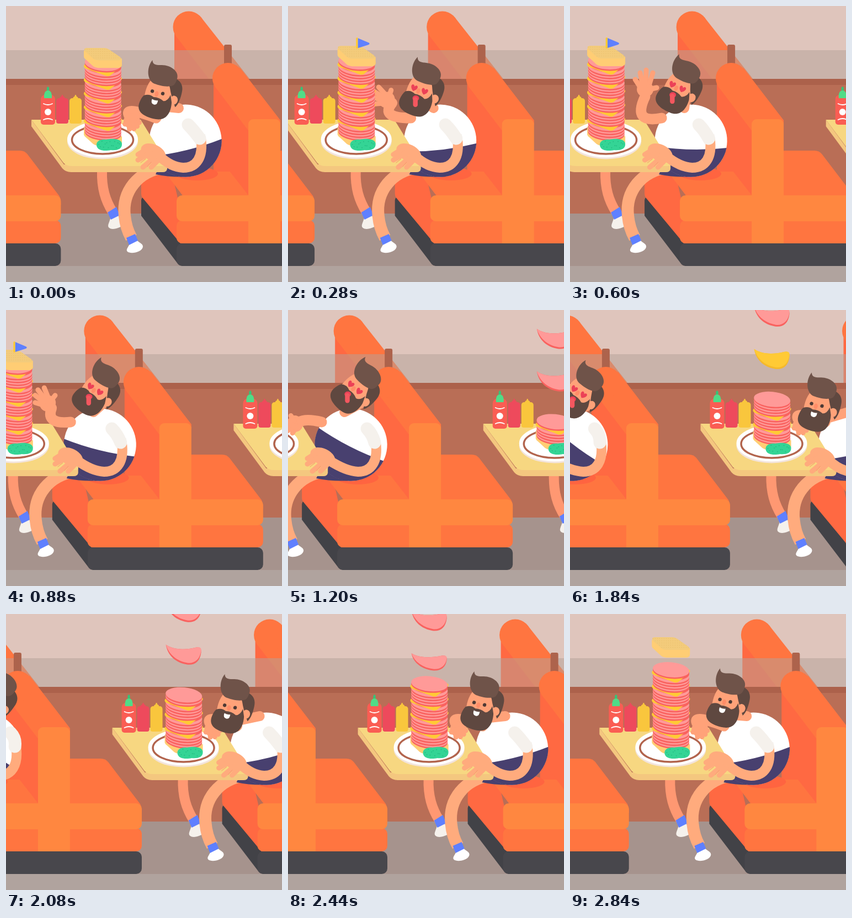
Animation, 500 px wide and 500 px high, one loop 2880 ms. Source, as an HTML page with a canvas:

```html
<!DOCTYPE html>
<html lang="en">
<head>
<meta charset="utf-8">
<title>Diner</title>
<style>
  html, body { margin: 0; height: 100%; overflow: hidden; background: #dfc5bc; }
  canvas { display: block; width: 100vw; height: 100vh; }
</style>
</head>
<body>
<canvas width="500" height="500"></canvas>
<script>
const ctx = document.querySelector('canvas').getContext('2d');
const FRAME_MS = 40, FRAMES = 72, SPACING = 527.6;
const C = {
  orange: '#ff7540', dark: '#ff6942', light: '#ff8740', base: '#48474c', baseSide: '#424247',
  skin: '#ffab7d', skinFar: '#ff9872', face: '#ffa279', hair: '#6f5349', beard: '#5f4840',
  navy: '#48406f', blue: '#5f80ff', white: '#fff', offWhite: '#f5f1ec',
  crust: '#ffcd74', crumb: '#f3cb7b', ham: '#ff9a98', hamEdge: '#f9625f', cheese: '#ffca35',
  red: '#ec4157', green: '#34d495'
};

// ---------- drawing helpers ----------
function fill(path, color) {
  ctx.fillStyle = color;
  ctx.fill(new Path2D(path));
}
function line(path, color, width, cap = 'round') {
  ctx.strokeStyle = color;
  ctx.lineWidth = width;
  ctx.lineCap = cap;
  ctx.lineJoin = 'round';
  ctx.stroke(new Path2D(path));
}
function oval(x, y, rx, ry, color, turn = 0) {
  ctx.fillStyle = color;
  ctx.beginPath();
  ctx.ellipse(x, y, rx, ry, turn, 0, 7);
  ctx.fill();
}
function box(x, y, w, h, r, color) {
  ctx.fillStyle = color;
  ctx.beginPath();
  ctx.roundRect(x, y, w, h, r);
  ctx.fill();
}
function at(x, y, degrees, draw) {
  ctx.save();
  ctx.translate(x, y);
  ctx.rotate(degrees * Math.PI / 180);
  draw();
  ctx.restore();
}
// Interpolates rows of [time, ...values] with a smooth or linear ramp.
function pose(t, keys, smooth = true) {
  if (t <= keys[0][0]) return keys[0].slice(1);
  for (let i = 1; i < keys.length; i++) {
    const a = keys[i - 1], b = keys[i];
    if (t > b[0]) continue;
    let p = (t - a[0]) / (b[0] - a[0]);
    if (smooth) p = p * p * (3 - 2 * p);
    return a.slice(1).map((v, j) => v + (b[j + 1] - v) * p);
  }
  return keys.at(-1).slice(1);
}

// ---------- room ----------
function farBench() {
  fill('M305 50V135H440L331 38Z', C.dark);
  fill('M309 56L372 138H446L353 20Z', C.orange);
  oval(331, 38, 28.5, 28.5, C.orange);
}
function wall() {
  box(0, 80, 500, 52, 0, 'rgba(179,161,154,.5)');
  box(0, 132, 500, 244, 0, '#b96e56');
  box(0, 132, 500, 11, 0, '#ac614b');
  box(0, 376, 500, 95, 0, '#a6938d');
  box(0, 471, 500, 29, 0, '#b0a39e');
}
function bench() {
  box(395, 70, 14, 45, 3, '#ad634c');
  // base and cushions seen from the left
  fill('M245 352Q246 344 252 349L330 440L322 471Q314 471 309 464L245 380Z', C.baseSide);
  fill('M245 300H300L330 430H316L247 347Q245 344 245 340Z', C.dark);
  // backrest and seat
  fill('M376 132V300L440 345V190Z', C.dark);
  fill('M287 300H376L440 300V346H322Z', C.orange);
  fill('M376 230V262L440 344V230Z', C.dark);
  fill('M380 148L440 227V215H497V207L424 112Z', C.orange);
  oval(402, 131, 28, 28, C.orange);
  fill('M490 262H553Q561 262 566 268L624 344Q627 350 627 360H490Z', C.orange);
  // front ends
  box(309, 430, 318, 41, 10, C.base);
  box(309, 388, 318, 42, 10, C.orange);
  box(309, 343, 318, 47, 10, C.light);
  box(439, 205, 58, 225, [9, 9, 0, 0], C.light);
  oval(346, 304, 38, 12, '#ff6440');
}

// ---------- table ----------
function legs() {
  line('M174 298C173 330 180 352 193 373', C.skinFar, 18, 'butt');
  fill('M190 381C188 392 182 398 187 402C193 407 208 401 212 397L202 377Z', C.offWhite);
  fill('M184 374L200 364L206 379L190 387Z', C.blue);
  line('M284 293C240 300 210 335 215 380Q217 402 227 420', C.skin, 22, 'butt');
  fill('M224 430C223 436 216 441 220 445C226 450 247 446 248 436C248 430 241 429 237 424Z', C.white);
  fill('M218 420L234 413L239 425L223 433Z', C.blue);
}
function squeezeBottle(x, color) {
  box(x - 11, 167, 22, 46, [5, 5, 4, 4], color);
  fill(`M${x - 5} 168L${x - 4} 165Q${x - 1} 164 ${x - 1} 161H${x + 1}Q${x + 1} 164 ${x + 4} 165L${x + 5} 168Z`, color);
}
function table() {
  fill('M46 206L105 287H292V295Q291 301 284 301H118Q108 301 102 294L46 218Z', '#f4c77f');
  fill('M46 206H244L292 284Q293 290 288 290H120Q109 290 104 284Z', '#f7d781');

  fill('M74 153Q73 147 76 146Q79 147 78 153Z', '#36c478');
  oval(76, 160, 6.5, 7, '#50dc87');
  box(63, 161, 26, 54, [8, 8, 5, 5], '#fa5d53');
  box(69, 158, 14, 9, [4, 4, 1, 1], '#50dc87');
  line('M68 177Q76 181 84 177M68 206Q76 202 84 206', C.white, 1.8);
  oval(76, 192, 6, 6, C.white);
  squeezeBottle(102, '#ee4a5c');
  squeezeBottle(126, '#f9c63d');

  oval(175, 245.5, 64, 32, '#f3e4dc');
  oval(175, 241.5, 64, 33, C.white);
  ctx.strokeStyle = '#b2644d';
  ctx.lineWidth = 3.5;
  ctx.beginPath();
  ctx.ellipse(175, 242.5, 55.5, 25.5, 0, 0, 7);
  ctx.stroke();
}

// ---------- sandwich ----------
function bread(y) {
  ctx.save();
  ctx.translate(0, y);
  fill('M141 5V17Q142 20 145 22L158 34Q162 37 167 37H204Q210 36 210 31V20Z', C.crust);
  const top = 'M146 0H178Q183 0 187 3L207 17Q212 23 205 23H168Q162 23 158 20L143 6Q139 1 146 0Z';
  fill(top, C.crumb);
  ctx.clip(new Path2D(top));
  ctx.setLineDash([1, 3]);
  for (let x = 143; x < 210; x += 4) line(`M${x} 2V22`, '#e6bb68', 1, 'butt');
  ctx.restore();
}
function slice(y, isCheese) {
  const cy = y + 14;
  if (isCheese) {
    // a square laid cornerwise, so only its tips show
    oval(175.7, cy, 33.2, 13.6, C.hamEdge, .1);
    fill(`M142 ${cy - 3}Q139 ${cy + 1} 144 ${cy + 4}L182 ${cy + 18}Q186 ${cy + 19} 189 ${cy + 17}L209 ${cy}Q212 ${cy - 4} 207 ${cy - 6}Z`, C.cheese);
  } else {
    oval(175.7, cy + 2.6, 33.2, 13.6, C.hamEdge, .1);
    oval(175.7, cy, 33.2, 13.6, C.ham, .1);
  }
}
function fallingSlice(y, flatness, isCheese) {
  ctx.save();
  ctx.translate(143, y);
  ctx.scale(1, flatness);
  fill('M0 0C12 8 30 11 55 5Q65 3 64 14C62 31 52 38 38 36C20 33 4 22 0 0Z', isCheese ? '#f5b92c' : C.hamEdge);
  fill('M0 0C12 8 30 11 55 5Q65 3 64 11C62 27 51 35 39 33C21 30 6 19 0 0Z', isCheese ? C.cheese : C.ham);
  ctx.restore();
}
function sandwich(t) {
  const squash = t < 0 ? 1 : 1 - .023 * Math.exp(-t / 3) * Math.cos(t * .8);
  ctx.save();
  ctx.translate(0, 245 * (1 - squash));
  ctx.scale(1, squash);
  bread(216);
  // one slice lands every second step
  for (let i = 0; i < 26; i++) {
    const landing = -52 + 2 * i, wait = landing - t, y = 213.7 - 5.07 * i;
    const isCheese = i % 5 === 4;
    if (wait <= 0) slice(y, isCheese);
    else if (wait < 7) fallingSlice(y - 36 * wait, wait < 2 ? .86 : 1, isCheese);
  }
  if (t > -5) bread(72 + Math.min(0, t) * 30);
  if (t > 1) {
    const y = Math.min(0, t - 5) * 30;
    box(174.5, 57 + y, 3.5, 20, 1.5, C.cheese);
    fill(`M178 ${58 + y}L197 ${66 + y}Q201 ${68 + y} 197 ${70 + y}L178 ${76 + y}Z`, C.blue);
  }
  ctx.restore();

  fill('M164 253C163 244 172 241 181 242C190 240 208 239 210 249C211 260 200 262 190 261C180 263 166 263 164 253Z', C.green);
  for (let i = 0; i < 14; i++)
    oval(168 + i * 2.9, 251 + 6 * Math.sin(i * 2.4), 1, 1, '#24bf84');
}

// ---------- diner guest ----------
function torso(t) {
  const [x, turn, waist] = pose(t, [[0, 325, -14, 12], [14, 329, 1, 11], [30, 334, 27, -1], [40, 338, 37, -7], [54, 343, 39, -7]]);
  fill('M278 290L271 305Q300 311 332 309V280Z', C.navy);
  at(x, 244, turn, () => {
    oval(0, 0, 65.5, 65.5, C.white);
    ctx.beginPath();
    ctx.arc(0, 0, 65.8, 0, 7);
    ctx.clip();
    fill(`M-70 ${waist}Q0 ${waist + 10} 70 ${waist}V70H-70Z`, C.navy);
  });
  return x;
}
function farArm(t, bodyX) {
  const [cx, cy, wx, wy, turn, reach] = pose(t, [
    [0, 206, 178, 226, 203, -200, .42], [11, 222, 214, 246, 164, 0, 1],
    [18, 222, 214, 246, 164, 0, 1], [28, 252, 196, 240, 203, -112, .6]]);
  line(`M${bodyX - 53} 203Q${cx} ${cy} ${wx} ${wy}`, C.face, 19);
  at(wx, wy, turn, () => {
    oval(0, -13 * reach, 15, 14, C.face);
    for (const [x, y] of [[-18, -31], [-9, -43], [2, -48], [14, -43], [21, -16]])
      line(`M${x * .35} ${-13 * reach}L${x * Math.sqrt(reach)} ${y * reach}`, C.face, 9);
  });
}
function nearArm(t) {
  const [a] = pose(t, [[0, 0], [14, 13], [30, 33], [40, 46], [54, 60]]);
  const ex = 351 + .78 * a, hx = .48 * a;
  line(`M${ex + 2} 240C${ex + 7} 274 ${ex - 6} 293 ${ex - 30} 293Q${ex - 52} 292 ${278 + hx} 272`, C.skin, 18);
  line(`M${330 + a} 215Q${340 + a} 225 ${ex} 240`, C.offWhite, 23);
  fill(`M${ex - 11} 240L${ex + 10} 232L${ex + 11} 244L${ex - 7} 251Z`, C.offWhite);
  ctx.save();
  ctx.translate(hx, 0);
  oval(267, 266, 24, 15, C.skin, .45);
  line('M258 257L239 269M262 266L239 279M268 275L248 292M276 279L263 292', C.skin, 9);
  line('M253 277L244 284M263 283L256 291', '#f5966b', 1);
  ctx.restore();
}
function heart(x) {
  fill(`M${x} 6C${x - 9} 0 ${x - 6} -7 ${x - 2} -5Q${x} -4 ${x} -2Q${x} -4 ${x + 2} -5C${x + 6} -7 ${x + 9} 0 ${x} 6Z`, C.red);
}
function head(t, bodyX) {
  const [x, y, turn] = t < 0
    ? pose(t, [[-44, 247, 183, 13], [-32, 254, 176, 13], [-20, 259, 167.5, 13], [0, 274.5, 156.5, 13]], false)
    : pose(t, [[0, 274.5, 156.5, 13], [14, 304, 146.5, 25], [30, 341, 141, 41], [40, 351, 147, 35], [54, 356, 151, 33]]);
  const inLove = t >= 6;
  line(`M${x + 14} ${y + 26}L${bodyX - 12} 185`, C.face, 18);
  at(x, y, turn, () => {
    fill('M-16 -20L28 -26L34 10L10 40L-20 24Q-25 -4 -16 -20Z', C.face);
    fill('M16 -32C34 -34 44 -24 43 -8C43 4 41 14 37 19L28 4L23 -6Q20 -14 16 -20Z', C.beard);
    oval(32, 7, 7, 8, C.face);
    fill('M-23 11Q-14 5 -5 10Q5 8 14 13Q22 11 24 -1L29 12C32 28 28 47 8 48C-16 49 -29 42 -28 27Q-27 17 -23 11Z', C.beard);
    fill('M-22 -55C-20 -46 -12 -48 -4 -50C12 -54 29 -46 29 -34Q29 -22 24 -18C14 -12 0 -13 -9 -14C-24 -17 -30 -40 -22 -55Z', C.hair);
    oval(-1, 3, 3.5, 5, '#ff8d68');
    if (inLove) {
      heart(-10);
      heart(10);
      // the tongue hangs straight down whatever the tilt
      at(-1, 20, -turn, () => {
        oval(1, -3, 6, 5, C.red);
        box(-4, -5, 8.5, 18, 4.2, '#f4575f');
      });
    } else {
      oval(-9.7, 0, 3.2, 3.2, '#4d3a35');
      oval(9.7, 0, 3.2, 3.2, '#4d3a35');
      fill('M-7 14Q-1 16 4 14Q5 23 -1.5 23Q-8 23 -7 14Z', C.white);
    }
  });
}

// ---------- scene ----------
function booth(t) {
  bench();
  legs();
  const bodyX = torso(t);
  table();
  farArm(t, bodyX);
  sandwich(t);
  head(t, bodyX);
  nearArm(t);
}
function eachBooth(frame, draw) {
  for (let k = -1; k <= 1; k++) {
    const t = frame - k * FRAMES;
    ctx.save();
    ctx.translate(-t * SPACING / FRAMES, 0);
    draw(t);
    ctx.restore();
  }
}
function render() {
  const frame = Math.floor(performance.now() / FRAME_MS + .1) % FRAMES;
  box(0, 0, 500, 500, 0, '#dfc5bc');
  eachBooth(frame, farBench);
  wall();
  eachBooth(frame, booth);
  requestAnimationFrame(render);
}
render();
</script>
</body>
</html>
```
